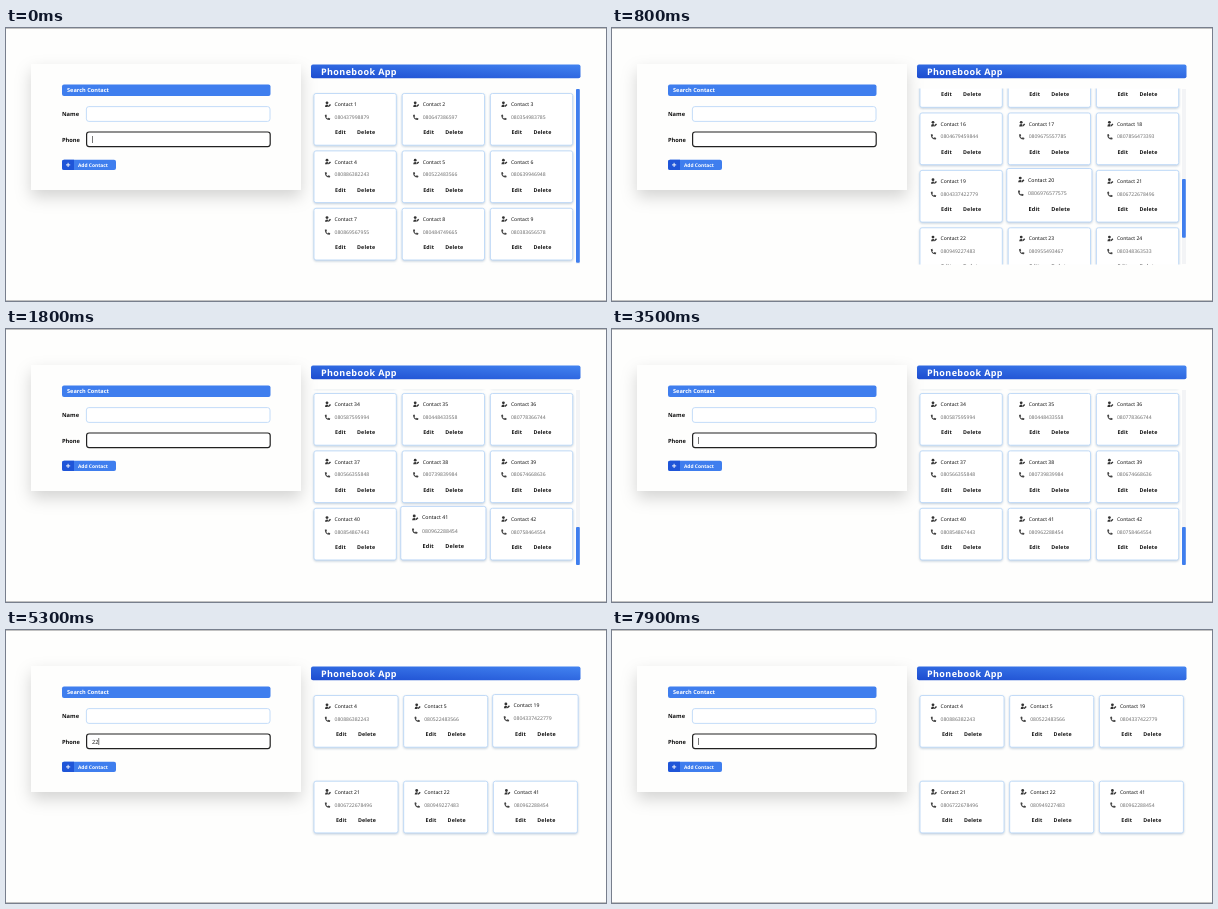
Animation, 600 px wide and 273 px high, one loop 8 s. Source, as an HTML page:

```html
<!DOCTYPE html>
<html lang="en">
<head>
<meta charset="utf-8">
<title>Phonebook</title>
<style>
  html, body { margin: 0; height: 100%; overflow: hidden; background: #fefefd; }
  svg { display: block; width: 600px; height: 273px; font-family: "Noto Sans", "Open Sans", sans-serif; }
  text { white-space: pre; text-rendering: geometricPrecision; }
  .bold { font-weight: 700; }
  .semi { font-weight: 600; fill: #fff; }
  .panel { fill: #fefefd; filter: drop-shadow(0 7px 8px rgba(0, 0, 0, .17)); }
  .box { fill: #fff; stroke: #bdd8f8; stroke-width: .9; filter: drop-shadow(0 1.5px 1.2px rgba(70, 110, 150, .32)); }
  .card { font-size: 5.05px; fill: #111; }
  .card .number { fill: #707070; }
  .card .bold { font-size: 5.3px; letter-spacing: .15px; }
</style>
</head>
<body>
<svg viewBox="0 0 600 273">
  <defs>
    <linearGradient id="blue" x1="0" y1="1" x2="1" y2="0">
      <stop offset="0" stop-color="#1c4cd0"/>
      <stop offset="1" stop-color="#4283f0"/>
    </linearGradient>
    <clipPath id="view"><rect x="303" y="60.5" width="266.5" height="176"/></clipPath>
    <g id="person" fill="#333">
      <circle cx="2" cy="1.5" r="1.4"/>
      <path d="M0 5.6Q0 3.3 2 3.3L3.2 3.6 2.6 5.6Z"/>
      <path d="M3 5.6L3.3 4.4 5 2.7 6 3.7 4.2 5.4Z"/>
    </g>
    <path id="phone" fill="#444" d="M0 .5L1.5 0 2.2 1.8 1.4 2.5Q2 3.6 3 4.1L3.7 3.3 5.5 4 5 5.5Q.2 5.6 0 .5Z"/>
  </defs>

  <path d="M0 .5H600M0 272.5H600" stroke="#c2c2c2"/>

  <rect class="panel" x="25" y="36" width="270" height="126"/>
  <rect x="56" y="56.5" width="208.5" height="11.6" rx="2" fill="#3f7eee"/>
  <text class="semi" x="61" y="64.4" font-size="5.6">Search Contact</text>
  <g class="bold" font-size="5.7" fill="#111">
    <text x="56" y="88">Name</text>
    <text x="56" y="113.5">Phone</text>
  </g>
  <rect x="80.4" y="78.6" width="183.6" height="14.8" rx="2.5" fill="#fff" stroke="#bdd8f8" stroke-width=".9"/>
  <rect x="80.6" y="104" width="183.6" height="14.6" rx="2.5" fill="#fff" stroke="#222" stroke-width="1.2"/>
  <text id="typed" x="86" y="113.7" font-size="5.7" fill="#222"></text>
  <rect id="caret" y="108" width=".8" height="7" fill="#555"/>
  <rect x="56" y="131.7" width="54" height="10.3" rx="2" fill="#3f7eee"/>
  <path d="M58 131.7H68V142H58Q56 142 56 140V133.700Q56 131.7 58 131.7Z" fill="#1f55d8"/>
  <path d="M60 136.900H64.200M62.100 134.800V139" stroke="#fff" stroke-width=".9"/>
  <text class="semi" x="72" y="138.700" font-size="4.900">Add Contact</text>

  <rect x="305" y="36.500" width="269.500" height="13.700" rx="2" fill="url(#blue)"/>
  <text class="bold" x="315" y="46.600" font-size="9" letter-spacing=".4" fill="#fff">Phonebook App</text>

  <g id="all">
    <g id="list" clip-path="url(#view)"></g>
    <rect x="570" y="61" width="4" height="175" fill="#f3f4f6"/>
    <rect id="thumb" x="570" width="3.800" rx="1" fill="#3f7eee"/>
  </g>
  <g id="found"></g>
</svg>
<script>
const $ = id => document.getElementById(id);
const LOOP = 8000, TICK = 100, ROW = 57.4, TOP = 65.5, VIEW = 175, CARD_H = 51.7;
const matches = [4, 5, 19, 21, 22, 41];

// Invented numbers; only the matching contacts contain "22".
function phoneNumber(id) {
  const length = id > 15 && id < 22 ? 13 : 12;
  let number = '080';
  while (number.length < length) {
    const noise = Math.abs(Math.sin(id * 12.9 + number.length * 78.2)) * 43758 % 1;
    number += 3 + Math.floor(noise * 7);
  }
  const at = 4 + id % 5;
  return matches.includes(id) ? number.slice(0, at) + '22' + number.slice(at + 2) : number;
}

// Each card is drawn around its own centre so that hovering can scale it.
function addCards(parent, ids, width) {
  const x = -width / 2, y = -CARD_H / 2;
  parent.innerHTML = ids.map(id => `<g class="card">
    <rect class="box" x="${x}" y="${y}" width="${width}" height="${CARD_H}" rx="2"/>
    <use href="#person" x="${x + 11}" y="${y + 7.8}"/>
    <use href="#phone" x="${x + 10.8}" y="${y + 21}"/>
    <text x="${x + 20.5}" y="${y + 12.6}">Contact ${id}</text>
    <text class="number" x="${x + 20.5}" y="${y + 25.4}">${phoneNumber(id)}</text>
    <text class="bold" x="-20.1" y="${y + 40.6}">Edit</text>
    <text class="bold" x="1.9" y="${y + 40.6}">Delete</text></g>`).join('');
  return [...parent.children];
}

const listCards = addCards($('list'), Array.from({ length: 42 }, (_, i) => i + 1), 82.3);
const foundCards = addCards($('found'), matches, 84);

function place(card, x, y, hover) {
  card.setAttribute('transform', `translate(${x} ${y + CARD_H / 2 - hover}) scale(${1 + .035 * hover})`);
}

// Linear interpolation through [time, value] pairs.
function track(t, keys) {
  const next = keys.findIndex(([time]) => time > t);
  if (next < 0) return keys[keys.length - 1][1];
  if (next === 0) return keys[0][1];
  const [t0, v0] = keys[next - 1], [t1, v1] = keys[next];
  return v0 + (v1 - v0) * (t - t0) / (t1 - t0);
}

const scrollKeys = [[0, 0], [800, 267.5], [1100, 628.4], [1300, 632.4]];
const hoverKeys = [[0, 0], [300, 1], [1000, 1], [1100, .4], [1200, 1], [1800, 1], [2000, 0]];
const caretOn = [[0, 600], [1100, 1600], [2300, 2700], [3500, 4500], [5000, 5500], [6300, 6900], [7200, LOOP]];

function drawList(t) {
  const scroll = track(t, scrollKeys), hover = track(t, hoverKeys);
  const hovered = Math.floor((190 - TOP + scroll) / ROW) * 3 + 1;
  listCards.forEach((card, i) => place(card, 349.15 + i % 3 * 88.2,
    TOP + Math.floor(i / 3) * ROW - scroll, i === hovered ? hover : 0));

  // More rows load as the bottom is reached, which shortens the thumb.
  const height = rows => rows * ROW + 4;
  const rows = [3, 6, 9, 12].find(n => scroll <= height(n) - VIEW) || 14;
  const ratio = VIEW / height(rows);
  $('thumb').setAttribute('y', 61 + scroll * ratio);
  $('thumb').setAttribute('height', VIEW * ratio);
}

function drawFound(t) {
  foundCards.forEach((card, i) => {
    const start = 5600 - i * 300;
    const hover = i < 3 ? track(t, [[start, 0], [start + 200, 1], [start + 400, 0]]) : 0;
    place(card, 350 + i % 3 * 89.7, TOP + Math.floor(i / 3) * 85.7, hover);
  });
}

function draw(t) {
  const count = t < 3800 || t >= 7900 ? 0 : t < 3900 || t >= 7200 ? 1 : 2;
  $('typed').textContent = '2'.repeat(count);
  $('caret').setAttribute('x', 86 + count * 3.2);
  $('caret').style.display = caretOn.some(([a, b]) => t >= a && t < b) ? '' : 'none';

  const filtered = t >= 4000;
  $('all').style.display = filtered ? 'none' : '';
  $('found').style.display = filtered ? '' : 'none';
  (filtered ? drawFound : drawList)(t);
}

function frame() {
  draw(Math.floor(performance.now() % LOOP / TICK) * TICK);
  requestAnimationFrame(frame);
}
frame();
</script>
</body>
</html>
```
